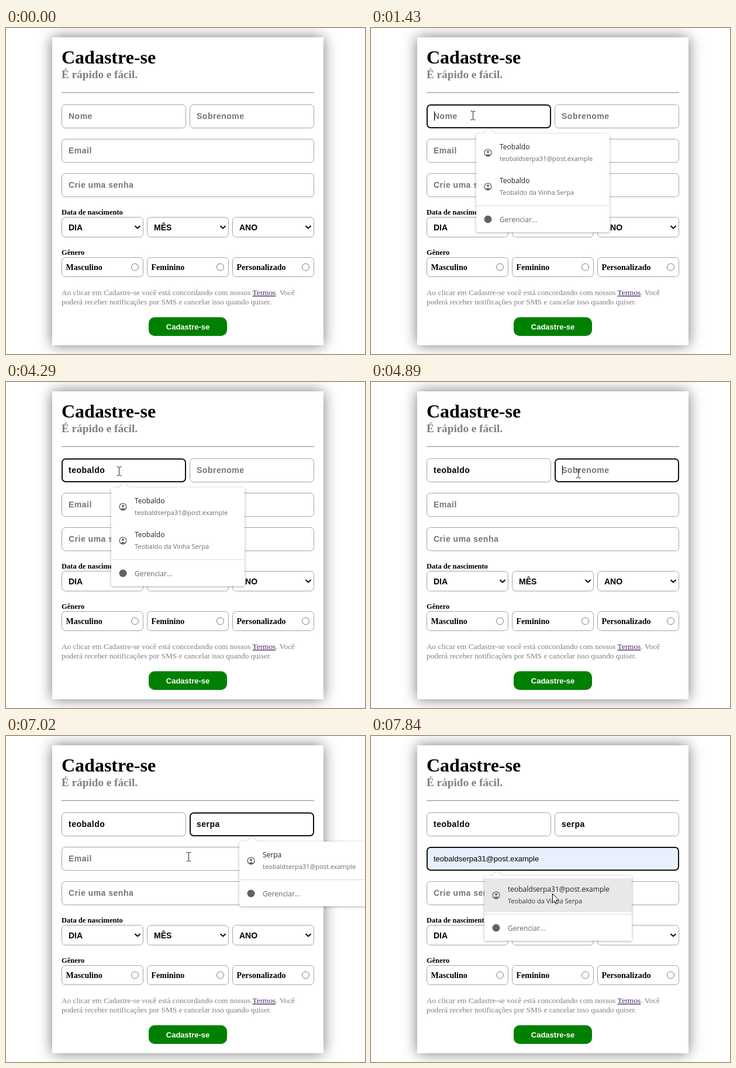
Recreate the animation shown at these times as an HTML page. Size 614 by 559 pixels, loop 8 s.

```html
<!DOCTYPE html>
<html lang="pt-BR">
<head>
<meta charset="utf-8">
<title>Cadastre-se</title>
<style>
html, body { margin: 0; width: 100%; height: 100%; overflow: hidden; background: #fff; }
svg { display: block; width: 614px; height: 559px; }
text { white-space: pre; }
.serif { font-family: "Liberation Serif", "Times New Roman", serif; }
.sans { font-family: "Liberation Sans", Arial, sans-serif; }
.ui { font-family: "Open Sans", "Noto Sans", sans-serif; }
.b { font-weight: bold; }
.input { font-size: 14px; letter-spacing: .5px; }
.box { fill: #fff; stroke: #a3a3a3; }
.card { fill: #fff; filter: drop-shadow(0 0 12px #777); }
.menu { filter: drop-shadow(0 1px 2px rgba(0,0,0,.32)); }
</style>
</head>
<body>
<svg id="stage" viewBox="0 0 614 559"></svg>
<script>
const LOOP = 8000, STEP = 70, BLINK = 535;
const FIRST = "teobaldo", LAST = "serpa";
const FULL = "Teobaldo da Vinha Serpa", MAIL = "teobaldserpa31@post.example";
const stage = document.getElementById("stage");

const text = (x, y, s, cls, size, fill = "#000", extra = "") =>
  `<text x="${x}" y="${y}" class="${cls}" font-size="${size}" fill="${fill}" ${extra}>${s}</text>`;
const box = (x, y, w, h, id = "") =>
  `<rect ${id && `id="${id}"`} class="box" x="${x + .5}" y="${y + .5}" width="${w - 1}" height="${h - 1}" rx="6"/>`;

const fields = [
  { id: "first", x: 95, y: 131, w: 213, hint: "Nome" },
  { id: "last", x: 314, y: 131, w: 213, hint: "Sobrenome" },
  { id: "mail", x: 95, y: 190, w: 432, hint: "Email" },
  { id: "pass", x: 95, y: 249, w: 432, hint: "Crie uma senha" }
];

const fieldMarkup = f => box(f.x, f.y, f.w, 41, f.id + "Box") +
  `<text id="${f.id}" class="sans b input" x="${f.x + 12}" y="${f.y + 25}" fill="#757575">${f.hint}</text>`;

const selectMarkup = (label, i) => {
  const x = 95 + 146 * i;
  return box(x, 324, 140, 35) + text(x + 12, 347, label, "sans b", 14) +
    `<path d="M${x + 125.5} 339.3l4.5 4.2 4.5-4.2" fill="none" stroke="#000" stroke-width="2"/>`;
};

const radioMarkup = (label, i) => {
  const x = 95 + 146 * i;
  return box(x, 393, 140, 34) + text(x + 7.5, 415, label, "serif b", 14) +
    `<circle cx="${x + 125.5}" cy="410" r="6" fill="#fff" stroke="#767676"/>`;
};

const person = (x, y) => `<g transform="translate(${x} ${y})" fill="none" stroke="#5f6368" stroke-width="1.4">
  <circle r="5.9"/><circle cy="-1.4" r="2" fill="#5f6368" stroke="none"/>
  <path d="M-4 4.2Q0 .3 4 4.2L0 6Z" fill="#5f6368" stroke="none"/></g>`;

// Autofill menu: each row is [main line, second line]
function menuMarkup(id, x, y, w, rows) {
  const sep = y + 8 + 58 * rows.length, end = sep + 45, tip = x + 22;
  const lines = rows.map(([main, sub], i) => {
    const top = y + 58 * i;
    return person(x + 20, top + 33) +
      text(x + 40, top + 27, main, "ui", 12, "#222") +
      text(x + 40, top + 47, sub, "ui sub", 11, "#6c6c6c");
  }).join("");
  return `<g id="${id}" display="none">
    <path class="menu" fill="#fff" d="M${x + 3} ${y}H${tip - 9}L${tip} ${y - 8}L${tip + 9} ${y}H${x + w - 3}
      q3 0 3 3V${end - 3}q0 3-3 3H${x + 3}q-3 0-3-3V${y + 3}q0-3 3-3Z"/>
    <rect class="hover" x="${x}" y="${y + 4}" width="${w}" height="58" fill="#e8e8e8" display="none"/>
    ${lines}
    <path d="M${x} ${sep - .5}h${w}" stroke="#dadada"/>
    <circle cx="${x + 20}" cy="${sep + 23}" r="6.5" fill="#5f6368"/>
    ${text(x + 40, sep + 28, "Gerenciar...", "ui", 12.1, "#666")}</g>`;
}

stage.innerHTML = `
  <rect class="card" x="79" y="16" width="464" height="528"/>
  ${text(95, 61, "Cadastre-se", "serif b", 32)}
  ${text(95, 86, "É rápido e fácil.", "serif b", 19.2, "#808080")}
  <path d="M95 110.5h432" stroke="#9a9a9a"/><path d="M95 111.5h432" stroke="#e4e4e4"/>
  ${fields.map(fieldMarkup).join("")}
  ${text(95, 320, "Data de nascimento", "serif b", 12.5)}
  ${["DIA", "MÊS", "ANO"].map(selectMarkup).join("")}
  ${text(95, 389, "Gênero", "serif b", 12.5)}
  ${["Masculino", "Feminino", "Personalizado"].map(radioMarkup).join("")}
  ${text(95, 458, `Ao clicar em Cadastre-se você está concordando com nossos <tspan fill="#4a2a66" text-decoration="underline">Termos</tspan>. Você`, "serif", 13.3, "#808080")}
  ${text(95, 474, "poderá receber notificações por SMS e cancelar isso quando quiser.", "serif", 13.3, "#808080")}
  <rect x="244" y="496" width="134" height="32" rx="10" fill="#008000"/>
  ${text(311, 517, "Cadastre-se", "sans b", 13, "#fff", 'text-anchor="middle"')}
  <rect id="caret" width="1" height="16"/>
  ${menuMarkup("menuFirst", 180, 181, 228, [["Teobaldo", MAIL], ["Teobaldo", FULL]])}
  ${menuMarkup("menuLastAll", 399, 181, 228, [["Serpa", MAIL], ["Serpa", FULL]])}
  ${menuMarkup("menuLast", 399, 181, 228, [["Serpa", MAIL]])}
  ${menuMarkup("menuMail", 194, 240, 252, [[MAIL, FULL]])}
  <g id="cursor">
    <circle id="glow" cx="-2" cy="-1" r="12" fill="#ffff80"/>
    <path id="beam" d="M-3.5-7.5h2.5l1.5 1 1.5-1h2.5M.5-6.5v13M-3.5 7.5h2.5l1.5-1 1.5 1h2.5" fill="none" stroke="#222"/>
    <path id="arrow" d="M.5.5v15.5l3.6-3.4 2.5 5.6 2.5-1.1-2.5-5.4h4.9Z" fill="#fff" stroke="#000"/>
  </g>`;

const el = id => document.getElementById(id);
const show = (node, on) => node.setAttribute("display", on ? "inline" : "none");
const set = (node, attrs) => { for (const k in attrs) node.setAttribute(k, attrs[k]); };

const firstKeys = [2420, 2550, 2680, 2810, 3440, 3540, 3640, 3740];
const lastKeys = [5750, 5850, 5950, 6150, 6350];
const caretOn = [970, 1960, ...firstKeys, 4890, ...lastKeys, 7240];
const clicks = [900, 4820, 7170];

// Pointer moves: start, end, x, y
const moves = [
  [220, 850, 174, 150], [1430, 1570, 193, 151], [1830, 1960, 193, 152],
  [4290, 4291, 193, 153], [4470, 4820, 354, 157], [6880, 7090, 297, 224],
  [7240, 7241, 297, 229], [7640, 7840, 310, 270]
];

function pointer(t) {
  let x = 563, y = 545;
  for (const [a, b, nx, ny] of moves) {
    if (t < a) break;
    const k = t >= b ? 1 : Math.floor((t - a) / STEP) * STEP / (b - a);
    const e = k * k * (3 - 2 * k);
    x += (nx - x) * e;
    y += (ny - y) * e;
  }
  return [Math.round(x), Math.round(y)];
}

const typed = (word, keys, t) => word.slice(0, keys.filter(k => k <= t).length);
const between = (t, a, b) => t >= a && t < b;

function draw(t) {
  const [px, py] = pointer(t);
  const hover = t >= 7640 && py >= 244;
  const focus = t < 970 ? "" : t < 4890 ? "first" : t < 7240 ? "last" : "mail";
  const values = {
    first: typed(FIRST, firstKeys, t),
    last: typed(LAST, lastKeys, t),
    mail: hover ? MAIL : "",
    pass: ""
  };

  show(el("caret"), false);
  for (const f of fields) {
    const on = f.id === focus, value = values[f.id], label = el(f.id);
    const inset = on ? 1 : .5;
    set(el(f.id + "Box"), {
      x: f.x + inset, y: f.y + inset, width: f.w - 2 * inset, height: 41 - 2 * inset
    });
    el(f.id + "Box").style.cssText = (on ? "stroke:#101010;stroke-width:2;" : "") +
      (f.id === "mail" && hover ? "fill:#e8f0fe" : "");
    label.textContent = value || f.hint;
    label.setAttribute("fill", value ? "#000" : "#757575");
    label.style.cssText = f.id === "mail" && hover ? "font-weight:400;font-size:13px;letter-spacing:0" : "";
    if (on && !hover) {
      const w = value ? label.getComputedTextLength() : 0;
      set(el("caret"), { x: Math.round(f.x + 12 + w) + 1, y: f.y + 12 });
      show(el("caret"), caretOn.some(k => between(t, k, k + BLINK)));
    }
  }

  show(el("menuFirst"), between(t, 970, 4890));
  show(el("menuLastAll"), between(t, 4960, 5750));
  show(el("menuLast"), between(t, 5750, 7240));
  show(el("menuMail"), t >= 7310);
  show(el("menuMail").querySelector(".hover"), hover);
  el("menuMail").querySelector(".sub").setAttribute("fill", hover ? "#333" : "#6c6c6c");

  const overText = px > 95 && px < 527 && !(t > 7310 && py > 232) &&
    fields.some(f => py >= f.y && py <= f.y + 41);
  show(el("cursor"), t >= 220);
  el("cursor").setAttribute("transform", `translate(${px} ${py})`);
  show(el("beam"), overText);
  show(el("arrow"), !overText);
  show(el("glow"), clicks.some(c => between(t, c, c + STEP)));
}

function tick() {
  draw(performance.now() % LOOP);
  requestAnimationFrame(tick);
}
tick();
</script>
</body>
</html>
```
